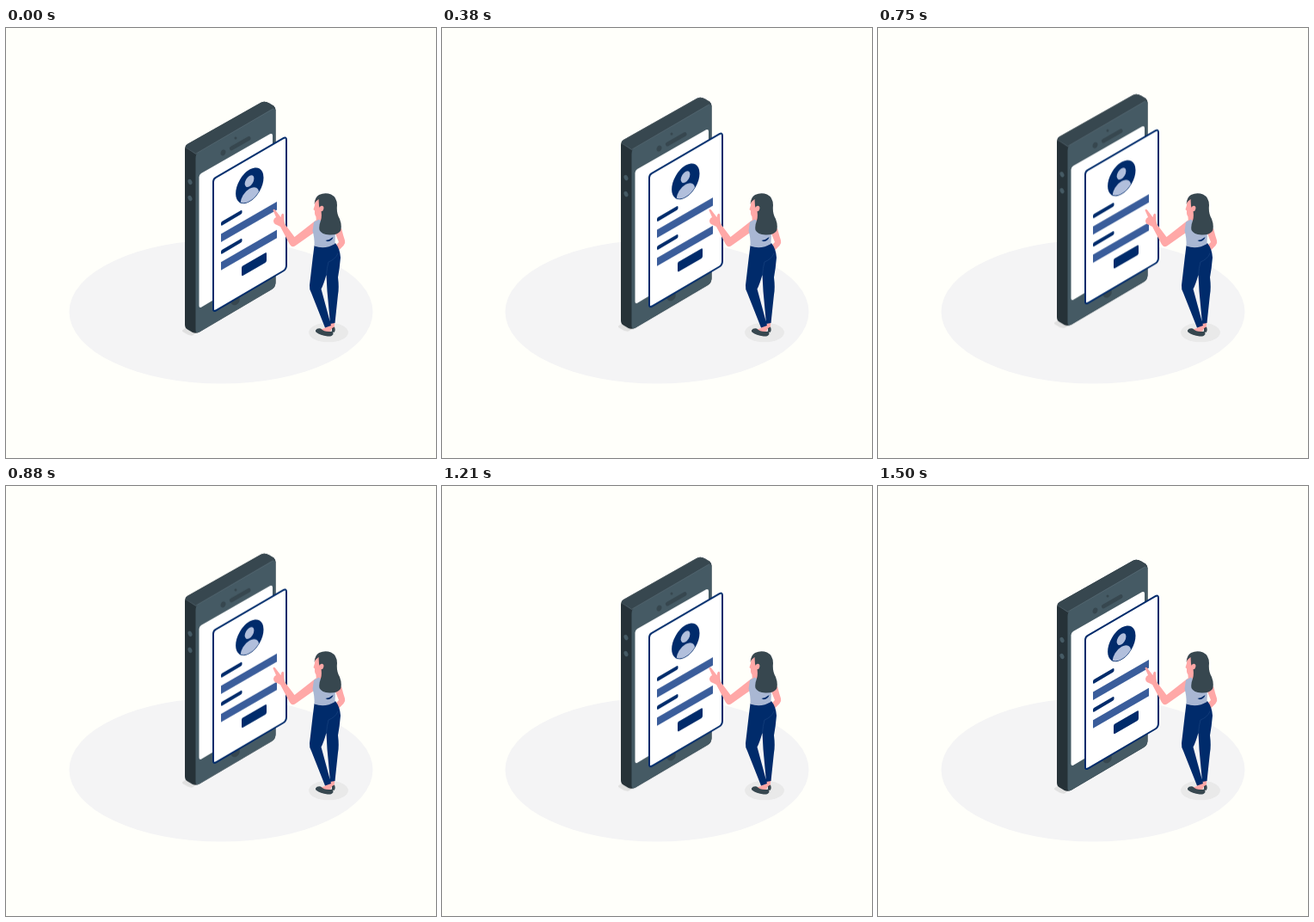
Write an HTML page that moves like this. It is 500x500 px and loops after 1.54 s.

```html
<!DOCTYPE html>
<html lang="en">
<head>
<meta charset="utf-8">
<title>Sign-in form</title>
<style>
  html, body { margin: 0; width: 100%; height: 100%; overflow: hidden; background: #fffffa; }
  svg { display: block; width: 100%; height: 100%; }
  .navy { fill: #002b6b; }
  .bar { fill: #3a5d9b; }
  .pale { fill: #b1bfdc; }
  .skin { fill: #ffa8a7; }
  .dark { fill: #263238; }
  .mid { fill: #37474f; }
  .slate { fill: #455a64; }
</style>
</head>
<body>
<svg viewBox="0 0 500 500">
  <defs>
    <clipPath id="disc"><circle r="18"/></clipPath>
  </defs>

  <ellipse cx="250" cy="330" rx="176.5" ry="83.5" fill="#f4f4f5"/>
  <ellipse cx="375" cy="354" rx="23" ry="11.3" fill="#e9e9e9"/>

  <g id="phone">
    <path fill="#e0e0e0" d="M205 351.500L210 348L222 354L217 357.500Q214 358 211 356.500L206 353.500Q204.500 352.500 205 351.500Z"/>

    <!-- body: side, top, front -->
    <path class="dark" d="M208 141Q208 137 211 135L296 87Q301 84.500 306 87.500L311 90.500Q313.500 92.500 313.500 96V296Q313.500 301 309 304L225 353.500Q220.500 356 216 353.500L211 350.500Q208 348.500 208 345Z"/>
    <path class="mid" d="M208.700 138Q209.500 136 211 135L296 87Q301 84.500 306 87.500L311 90.500Q313.500 92.500 313.500 96L222 148Z"/>
    <path class="slate" d="M220.500 151Q220.500 146.500 224 144.300L308 95Q313.500 92 313.500 97V296Q313.500 301 309 304L225 353.500Q220.500 356 220.500 351Z"/>
    <path d="M209 139L220.500 146.300L311 93.700" fill="none" stroke="#62757e" stroke-width=".5"/>
    <ellipse class="slate" rx="2.300" ry="3.300" transform="translate(214 179) rotate(-25)"/>
    <ellipse class="slate" rx="2.300" ry="3.300" transform="translate(214 198) rotate(-25)"/>

    <ellipse class="mid" rx="2.700" ry="3.600" transform="translate(252.500 145) rotate(25)"/>
    <path d="M262.200 140L282.300 128.400" stroke="#37474f" stroke-width="4.600" stroke-linecap="round"/>
    <circle class="mid" cx="267" cy="128" r="1.500"/>
    <ellipse class="mid" rx="5" ry="6" transform="translate(266.500 316.500) rotate(30)"/>
    <path fill="#fff" d="M224.500 173.500Q224.500 170.500 227 169L307 123.300Q310 122 310 125V275L227.500 324.500Q224.500 326 224.500 323Z"/>

    <!-- form card -->
    <path fill="#fff" stroke="#002b6b" stroke-width="2" d="M241 179Q241 175.500 244 173.800L323 128Q326 126.500 326 130V276Q326 280.500 322.500 282.500L244 328.500Q241 330 241 327Z"/>
    <g transform="matrix(.866 -.5 0 1 283.300 183.300)">
      <circle class="navy" r="18.700"/>
      <circle class="pale" cx="-.3" cy="-5.300" r="6.200"/>
      <ellipse class="pale" cy="15" rx="12.500" ry="11.500" clip-path="url(#disc)"/>
    </g>
    <path id="label" class="navy" d="M250 227Q250 225.500 251.500 224.700L273 212.200Q274.500 211.500 274.500 213V214.500Q274.500 216 273 216.800L251.500 229.500Q250 230.300 250 229Z"/>
    <path id="field" class="bar" d="M250 239.500L315 202V211.500L250 249Z"/>
    <use href="#label" y="33"/>
    <use href="#field" y="32.700"/>
    <path class="navy" d="M274 279Q274 277.500 275.500 276.600L301.500 261.600Q303 260.800 303 262.500V270Q303 272 301.500 273L275.500 288Q274 288.800 274 287Z"/>
  </g>

  <g id="woman">
    <!-- feet -->
    <path class="skin" d="M371 345L378 344V352Q374 355 365 351L371 349ZM377 341L382.500 340L381.500 350L378 350Z"/>
    <path class="mid" d="M360 351.500Q361.500 348.800 366 349.500Q371 354.500 380 352.500L380.500 356Q379 359 374 358.500Q365 357 361 354Q359.500 353 360 351.500ZM379 349L382 347.500Q383.500 352 381.500 354L379 353Z"/>

    <!-- far arm -->
    <path class="skin" d="M383 239L390 233Q392 241 394 247Q395 250 392.500 253L387.500 258Q383 260 381 255L387 249Q385 244 383 239Z"/>

    <!-- trousers -->
    <path class="navy" d="M358.500 253Q371 257 383 250Q388.500 257 389 267Q388 279 386 290Q387.500 302 386 310L382.500 343L377 344L373.500 306L372.500 287Q369 299 366.500 303.500L378 346L371 348.500L355 308Q352.500 304 353 299L356.500 269Z"/>
    <path d="M386 262Q383 269 375 272Q373 279 372.500 288" fill="none" stroke="#234a86" stroke-width=".5"/>

    <!-- near arm and pointing hand -->
    <path class="skin" d="M361 223L335.500 243L325 229Q323.700 227 323.500 224L323 217Q322 214.500 320.300 217L319.500 220L313 211.500Q311 209.800 310.500 212L314 220Q311.500 221 311 224Q311 228 315 229L319 231L329 250Q332 256 336 253.500L358 238Z"/>

    <!-- neck, top, head -->
    <path class="skin" d="M360 214L371 212V229L361 226Z"/>
    <path fill="#a9b7d3" d="M358 225.500L364 222.500Q368 227 372 226L383 237L382.500 251Q371 258 358.500 253.500Q359 244 356.500 236Z"/>
    <path class="navy" d="M371.500 247Q377 246 380.500 243Q379.500 247.500 374 248.300Z"/>
    <path class="skin" d="M361 197Q358.500 201 359 206L357.500 211L359 212.500Q358.500 218 361 219.300L368 218L371 198Z"/>
    <path class="mid" d="M358.500 205Q359 197 364 194Q371 190.800 378 193.500Q385 197 385 206Q384 216 388 222Q391 230 389 236Q385 241 376 240.500Q367 240 364.500 235Q363.500 230 366 224Q367.500 219 366.500 213L364 207L363.500 199Q360 201 358.500 205Z"/>
    <ellipse class="skin" cx="366.800" cy="210" rx="2.500" ry="3.300" transform="rotate(15 366.800 210)"/>
  </g>
</svg>
<script>
  const LOOP = 1540;
  // [time in ms, lift in px]
  const lift = [
    [0, .1], [170, 2.1], [380, 4.900], [540, 7.100], [730, 9],
    [1040, 5.300], [1210, 2.900], [1500, 0], [LOOP, 0]
  ];
  const steps = lift.map(([t, y]) => ({
    offset: t / LOOP,
    transform: `translateY(${-y}px)`
  }));
  document.getElementById('phone').animate(steps, { duration: LOOP, iterations: Infinity });
</script>
</body>
</html>
```
